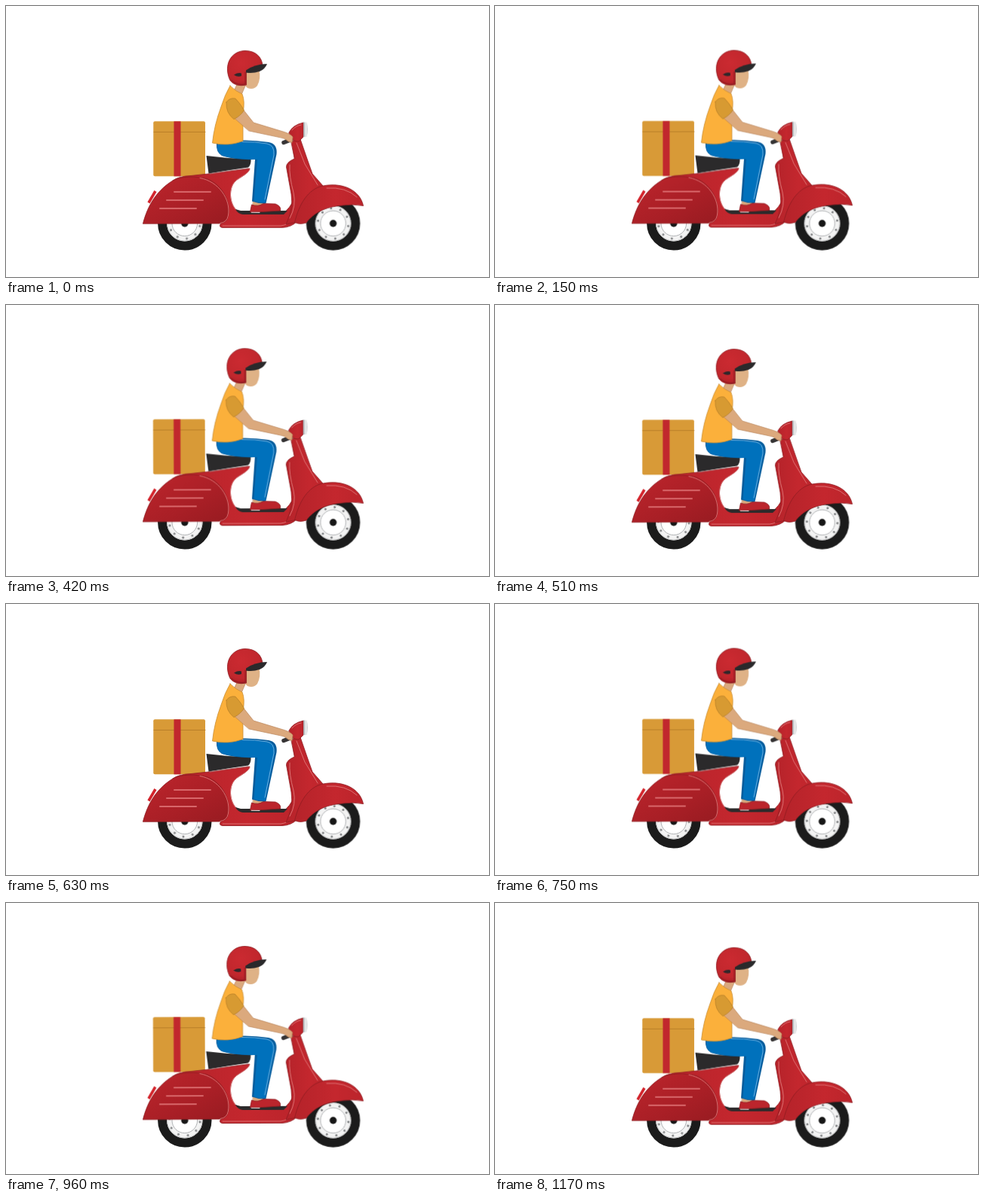
An HTML page for the animation above (1200 ms loop, 640 by 360 pixels).

```html
<!DOCTYPE html>
<html lang="en">
<head>
<meta charset="utf-8">
<title>Scooter delivery</title>
<style>
html, body { margin: 0; width: 100%; height: 100%; overflow: hidden; background: #fff; }
svg { display: block; width: 100vw; height: 100vh; }
.bob {
  transform-origin: 330px 290px;
  animation: bob 300ms cubic-bezier(.37, 0, .63, 1) -555ms infinite alternate;
}
.spin { animation: spin 1200ms linear infinite; }
.edge { stroke: #8f1c21; stroke-width: .8; }
.shine { fill: none; stroke: #e0797a; stroke-width: .9; }
.skin { fill: #dba97d; stroke: #b98459; stroke-width: .7; }
@keyframes bob { to { transform: translateY(-2.1px) rotate(-.2deg); } }
@keyframes spin { to { transform: rotate(360deg); } }
</style>
</head>
<body>
<svg viewBox="0 0 640 360">
  <defs>
    <linearGradient id="cowl" x1="0" y1="0" x2="1" y2="1">
      <stop offset="0" stop-color="#bd252c"/>
      <stop offset=".6" stop-color="#a91f26"/>
      <stop offset="1" stop-color="#981b21"/>
    </linearGradient>
    <linearGradient id="red">
      <stop offset="0" stop-color="#b5232a"/>
      <stop offset=".6" stop-color="#c4272e"/>
      <stop offset="1" stop-color="#bb242b"/>
    </linearGradient>
    <radialGradient id="helmet" cx=".4" cy=".35" r=".7">
      <stop offset="0" stop-color="#cb2a31"/>
      <stop offset=".7" stop-color="#c1272d"/>
      <stop offset="1" stop-color="#a71f25"/>
    </radialGradient>
    <linearGradient id="lamp">
      <stop offset="0" stop-color="#9da1a5"/>
      <stop offset=".6" stop-color="#f1f2f2"/>
      <stop offset="1" stop-color="#c6c8ca"/>
    </linearGradient>
    <g id="wheel">
      <circle r="29.700" fill="#fff" stroke="#1b1b1b" stroke-width="12"/>
      <circle r="23.200" fill="#f3f3f3" stroke="#c4c5c6"/>
      <circle r="16.800" fill="#fff" stroke="#a9abad" stroke-width=".9"/>
      <circle class="spin" r="20.300" fill="none" stroke="#808284" stroke-width="3"
        stroke-linecap="round" pathLength="100" stroke-dasharray=".01 9.99"/>
      <circle r="4.700" fill="#161616"/>
    </g>
  </defs>

  <use href="#wheel" x="236.800" y="288.800"/>
  <use href="#wheel" x="433.500" y="288.800"/>

  <g class="bob" stroke-linecap="round" stroke-linejoin="round">
    <!-- parcel -->
    <rect x="195.300" y="153.300" width="68.700" height="73" rx="2" fill="#d89a37"/>
    <path d="M196 167.500H264" stroke="#b97f28"/>
    <path d="M222.500 153.300h9v73h-9z" fill="#c1272d"/>

    <!-- rear body and floor -->
    <path d="M198 246l-9 15.500" stroke="#d3242c" stroke-width="3.600" stroke-linecap="butt"/>
    <path class="edge" d="M221 232Q229 226 245 225.500L268 223Q296 219 323 216C322 222 313 226 306 231C295 239 295 259 304 270L312 276H364Q372 274 379 262L386 286Q378 294 366 294.500H287Q282 294 284 290L292 279Z" fill="url(#red)"/>
    <path class="shine" d="M323 217C322 222 313 226 306 231C295 239 295 259 304 270"/>
    <path d="M304 270L311 272H373L368 277H314Q307 276 304 270Z" fill="#2c2a2b"/>
    <path class="shine" d="M287 292H364Q374 291 380 283"/>
    <path class="edge" d="M181.500 289C186 272 195 248 221 232C231 226 252 226 266 229.500C286 237 298 259 294.500 279Q293 288.500 283 289Z" fill="url(#cowl)"/>
    <path class="shine" d="M257 228.500C282 233 298 257 294.500 278Q293 287.500 284 288.500"/>
    <path d="M223 247H271M213 258H261M204 269H252" stroke="#d8676a" stroke-width="2"/>

    <!-- seat -->
    <path d="M265.500 199Q295 203 324.500 203.500Q325 211 321 214.500Q296 218 268.500 222.500Z" fill="#2b2a2b"/>
    <path d="M270 223Q296 219 321 215.500" fill="none" stroke="#b98a8a" stroke-width=".7"/>

    <!-- front shield -->
    <path class="edge" d="M378 180L390 177L400 206L406 223L420 239L424 246Q398 258 386 287L371 290Q381 270 378 250L371.500 214Q371 208 382 203Z" fill="url(#red)"/>
    <path class="shine" d="M385 182L396 210L413 238"/>
    <path class="shine" d="M376 211Q375 226 381 248Q385 266 376 282"/>
    <path class="edge" d="M375 168Q380 158 394 155V174L388 180Q379 180 376 174Z" fill="url(#red)"/>
    <path class="shine" d="M379 165Q384 159 391 158"/>
    <path d="M394 154.500H398.500Q401 164 398.500 174H394Z" fill="url(#lamp)"/>

    <!-- leg and shoe -->
    <path class="skin" d="M328 256H344L342 267H327Z"/>
    <path d="M324 272H338L336 275H325Z" fill="#ececec"/>
    <path class="edge" d="M323.500 273.500L325.500 264Q334 267 341 262.500L357 263Q365 266 363.500 272L340 273.500Z" fill="#bb252c"/>
    <path d="M279 183Q310 175 348 181Q360 183 358.500 197L344.500 262Q335 263 326 259.500L330 204Q304 205 286 199Q278 194 279 183Z" fill="#075c9c"/>
    <path d="M280 184Q314 178 346 182.500Q357 184 356 198L343.500 261Q335 262 328.500 259L333 204Q304 204 287 199Q279 194 280 184Z" fill="#0071bc"/>
    <path d="M313 180.500Q330 180 346 183Q356 185 355 198L343 257" fill="none" stroke="#78b5e2" stroke-width=".9"/>

    <!-- torso and head -->
    <path class="skin" d="M302 113L307 102L318 104L312 118Z"/>
    <path d="M297 106Q305 114 313 117Q317 127 314 142L314 179.500Q294 187 273.500 182Q276 158 285 134Q290 118 297 106Z" fill="#fbb03b" stroke="#c98f35" stroke-width=".8"/>
    <path d="M314 85H335.500Q338 97 333 106Q328 112 320 109Q315 105 314 98Z" fill="#dfb286"/>
    <path class="edge" d="M295 94C289 74 301 59.500 317 59.500C331 59.500 339 68 340 79L318.500 86V105Q304 108 297 99Z" fill="url(#helmet)"/>
    <path d="M317 88V104Q307 106 299 99" fill="none" stroke="#8e1a20"/>
    <path d="M318 85.500Q330 77 346 77Q343 84.500 336 87Q327 90 318 88.500Z" fill="#2a292b"/>
    <path d="M302 91.500Q308 88 312 89.500V93Q307 95 302 91.500Z" fill="#30272a"/>

    <!-- arm and grip -->
    <path d="M368 181.500L377 178" stroke="#353334" stroke-width="5.500"/>
    <path class="skin" d="M303 149L315 138.500L328 155L364 166Q376 169 380 174L379 181.500L374 180Q369 175 362 174.500L322 166Z"/>
    <path d="M292 128Q296 121.500 304 123Q310 129 315.500 138.500Q311 146 302 150.500Q291 142 292 128Z" fill="#d79a32" stroke="#b57d28" stroke-width=".7"/>

    <!-- front fender -->
    <path class="edge" d="M382.500 287.500C388 264 400 243 420 239C447 234 469 245 473.500 265.500Q459 263 446 265C422 267 408 275 398 288Q389 291 382.500 287.500Z" fill="url(#red)"/>
    <path class="shine" d="M425 242Q450 240 465 254"/>
  </g>
</svg>
</body>
</html>
```
